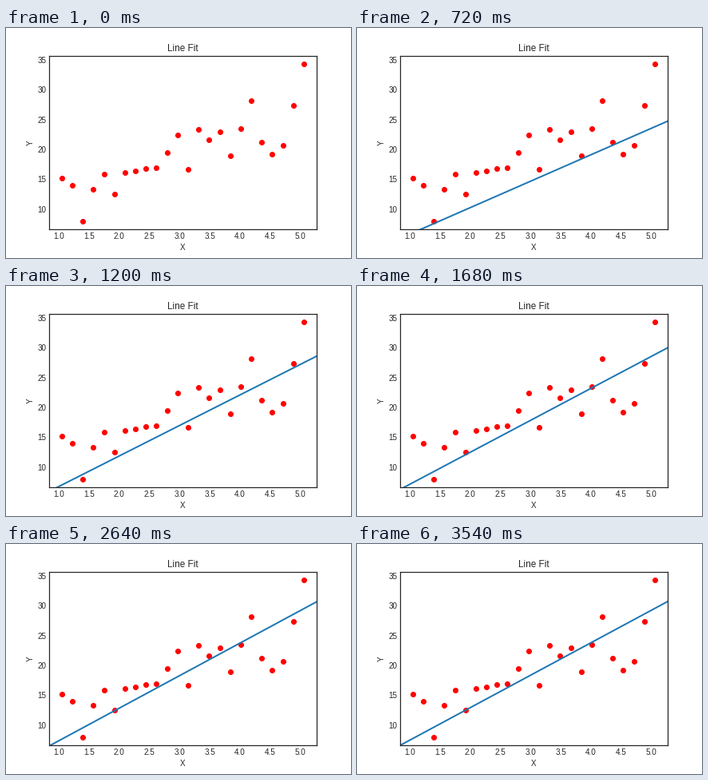
Write a matplotlib script that moves like this. It is 432 by 288 pixels and loops after 3.6 s.

```python
import numpy as np
import matplotlib.pyplot as plt
from matplotlib.animation import FuncAnimation

FRAMES = 60
INTERVAL = 60
RATE = 0.01
MARKER_RADIUS = 3
DARK = "0.15"

plt.rcParams.update({
    "font.family": "Liberation Sans",
    "font.size": 9.9,  # just under 10 and 12, so hinting rounds heights down
    "axes.titlesize": 11.8,
    "text.color": DARK,
    "axes.labelcolor": DARK,
    "axes.edgecolor": DARK,
    "axes.linewidth": 1.25,
    "xtick.color": DARK,
    "ytick.color": DARK,
    "xtick.major.size": 0,
    "ytick.major.size": 0,
})

# Noisy samples around y = 4x + 7
np.random.seed(10)
x = np.radians(np.arange(60, 300, 10))
y = 4 * x + 7 + np.random.normal(0, 3, len(x))


def descend(steps):
    """Gradient descent on the mean squared error, starting from zero."""
    slope = intercept = 0.0
    path = []
    for _ in range(steps):
        error = slope * x + intercept - y
        slope -= RATE * np.mean(error * x)
        intercept -= RATE * np.mean(error)
        path.append((slope, intercept))
    return path


def limits(values, pixels):
    """Data range with a small marker allowance and a 5 % margin."""
    pad = MARKER_RADIUS / pixels
    low, high = values.min() - pad, values.max() + pad
    margin = 0.05 * (high - low)
    return low - margin, high + margin


fits = descend(FRAMES)

fig, ax = plt.subplots(figsize=(6, 4), dpi=72, facecolor="white")
fig.subplots_adjust(left=0.125, right=0.9, bottom=0.125, top=0.88)
ax.scatter(x, y, color="red")
ax.set(title="Line Fit", xlabel="X", ylabel="Y",
       xticks=np.arange(1, 5.1, 0.5), yticks=range(10, 36, 5),
       xlim=limits(x, ax.bbox.width), ylim=limits(y, ax.bbox.height))

ends = np.array([0.0, 6.0])
line, = ax.plot([], [], color="#1f77b4", lw=2, scalex=False, scaley=False)


def update(frame):
    slope, intercept = fits[frame]
    line.set_data(ends, slope * ends + intercept)
    return line,


anim = FuncAnimation(fig, update, frames=FRAMES, interval=INTERVAL,
                     repeat=True, repeat_delay=0)
plt.show()
```
